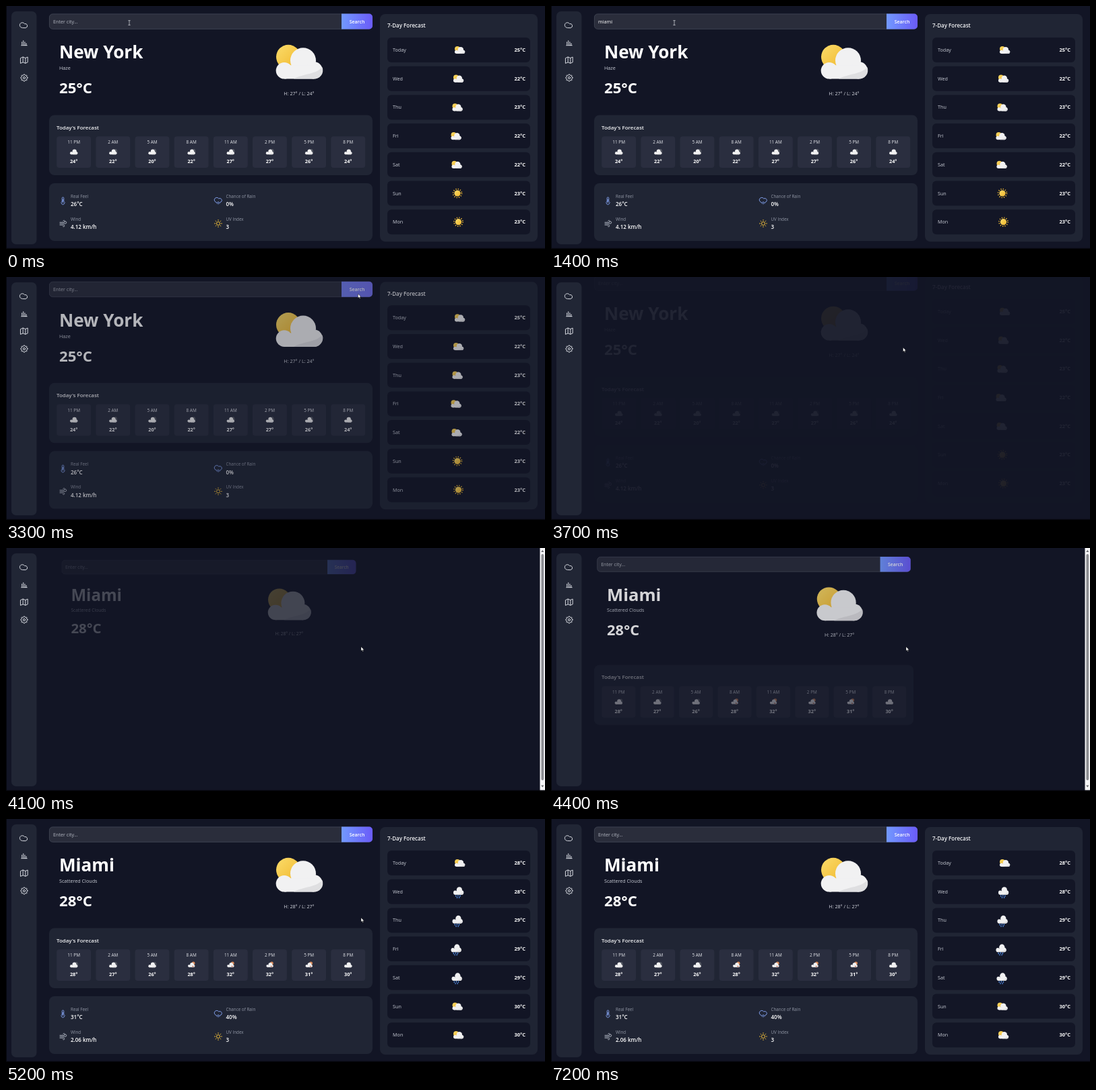
Animation, 800 px wide and 362 px high, one loop 7900 ms. Source, as an HTML page:

```html
<!DOCTYPE html>
<html lang="en">
<head>
<meta charset="utf-8">
<title>Weather dashboard</title>
<style>
html, body { margin: 0; width: 100%; height: 100%; overflow: hidden; background: #121525; }
svg { display: block; position: absolute; top: 0; left: 0; }
text { font-family: "Open Sans", "Noto Sans", sans-serif; white-space: pre; }
.line { fill: none; stroke-linecap: round; stroke-linejoin: round; }
</style>
</head>
<body>
<svg width="800" height="362" viewBox="0 0 800 362">
  <defs>
    <linearGradient id="btn"><stop stop-color="#7299ff"/><stop offset="1" stop-color="#6a5bf7"/></linearGradient>
    <linearGradient id="hover"><stop stop-color="#7280f0"/><stop offset="1" stop-color="#7271ee"/></linearGradient>
    <linearGradient id="gold" x2="1" y2="1"><stop stop-color="#fbdc6a"/><stop offset="1" stop-color="#f0b62c"/></linearGradient>
    <g id="cloud">
      <g fill="#f1f1f2">
        <circle cx="-22" cy="13" r="12.3"/><circle cx="6" cy="-2" r="19"/>
        <circle cx="22" cy="12.5" r="12.8"/><path d="M-22 5H22V25.3H-22Z"/>
      </g>
      <path d="M34.5 8C24 19 8 17 -8 25.3H22A12.8 12.8 0 0 0 34.5 8Z" fill="#dfdfe1"/>
    </g>
    <g id="part"><circle cx="-16" cy="-7.5" r="18" fill="url(#gold)"/><use href="#cloud"/></g>
    <g id="dark">
      <use href="#cloud"/>
      <path d="M14 -20C22 -30 38 -24 35 -10C42 -6 42 4 34 5C32 -2 26 -4 24 -4Q24 -14 14 -20Z" fill="#555963"/>
    </g>
    <g id="shower">
      <circle cx="18" cy="-12" r="15" fill="#d98a5a"/><use href="#cloud" transform="scale(.9)"/>
      <path d="M8 12L20 20" stroke="#b7614c" stroke-width="7"/>
    </g>
    <g id="rain">
      <use href="#cloud" transform="translate(0 -8) scale(1 1.15)"/>
      <path d="M-17 27v5M-3 25v5M11 27v5M-9 38v4M5 38v4" class="line" stroke="#4a7fd0" stroke-width="7"/>
    </g>
    <g id="sun">
      <circle r="21" fill="url(#gold)"/>
      <circle r="29" fill="none" stroke="#f3bd35" stroke-width="9" stroke-dasharray="5 10.18"/>
    </g>
  </defs>
  <path fill="#121525" d="M0 0H800V362H0Z"/>
  <g id="page"></g>
  <rect x="8" y="8" width="37.5" height="347" rx="7" fill="#212635"/>
  <g class="line" stroke="#d5d8df">
    <path d="M24 32.5A3.9 3.9 0 1 1 27.6 26.6A3 3 0 1 1 29.5 32.5Z"/>
    <path d="M23.6 59V53M25.7 59V51M27.9 59V53.500M30 59V55M22.500 58.700H31.500" stroke-width="1.300" stroke-dasharray="1.600 .4" stroke-linecap="butt"/>
    <path d="M21.800 77.500L25.200 76L28.800 77.500L32.200 76V83.800L28.800 85.300L25.200 83.800L21.800 85.300ZM25.200 76V83.800M28.800 77.500V85.300"/>
    <circle cx="27" cy="107" r="1.600"/>
    <path id="gear"/>
  </g>
  <path fill="#05060b" d="M0 0H1V362H0ZM0 360.700H800V362H0Z"/>
  <g id="top"></g>
</svg>
<script>
const LOOP = 7900, LEAVE = 3100, SWAP = 3800;
const $ = id => document.getElementById(id);
const clamp = v => Math.max(0, Math.min(1, v));
const ease = u => u * u * (3 - 2 * u);

const hours = ["11 PM", "2 AM", "5 AM", "8 AM", "11 AM", "2 PM", "5 PM", "8 PM"];
const days = ["Today", "Wed", "Thu", "Fri", "Sat", "Sun", "Mon"];
const iconX = [673.5, 671.5, 670, 668, 669, 670, 671.5];

const newYork = {
  city: "New York", sky: "Haze", temp: 25, range: "H: 27° / L: 24°",
  hourly: [24, 22, 20, 22, 27, 27, 26, 24], hourIcons: "cddddddc",
  week: [25, 22, 23, 22, 22, 23, 23], weekIcons: "pppppss",
  stats: ["26°C", "0%", "4.12 km/h", "3"]
};
const miami = {
  city: "Miami", sky: "Scattered Clouds", temp: 28, range: "H: 28° / L: 27°",
  hourly: [28, 27, 26, 28, 32, 32, 31, 30], hourIcons: "dddhhhhc",
  week: [28, 28, 29, 29, 29, 30, 30], weekIcons: "prrrrpp",
  stats: ["31°C", "40%", "2.06 km/h", "3"]
};
const icons = { c: "cloud", d: "dark", p: "part", h: "shower", r: "rain", s: "sun" };

// Pointer path: time, x, y
const path = [
  [1700, 400, 28], [1800, 497, 28], [2200, 497, 28], [2300, 520, 32], [2500, 597, 53],
  [2700, 594, 46], [2800, 575, 38], [3000, 523, 26], [3300, 522.5, 25], [3700, 522.5, 105],
  [4100, 527, 147], [6300, 527, 147], [6400, 515.5, 138.5], [6800, 515.5, 138.5], [7100, 424, 36]
];

const rect = (x, y, w, h, r, fill, more = "") =>
  `<rect x="${x}" y="${y}" width="${w}" height="${h}" rx="${r}" fill="${fill}" ${more}/>`;
const text = (x, y, size, str, fill = "#fff", weight = 400, anchor = "start") =>
  `<text x="${x}" y="${y}" font-size="${size}" fill="${fill}" font-weight="${weight}" text-anchor="${anchor}">${str}</text>`;
const icon = (key, x, y, s) =>
  `<use href="#${icons[key] || key}" transform="translate(${x} ${y}) scale(${s})"/>`;
const group = (body, opacity, transform = "") =>
  opacity > 0 ? `<g opacity="${opacity}" transform="${transform}">${body}</g>` : "";
const line = (d, color, width = 1) =>
  `<path class="line" d="${d}" stroke="${color}" stroke-width="${width}"/>`;

function spokes(cx, cy, n, r1, r2) {
  let d = "";
  for (let i = 0; i < n; i++) {
    const a = i * 2 * Math.PI / n, c = Math.cos(a), s = Math.sin(a);
    d += `M${cx + r1 * c} ${cy + r1 * s}L${cx + r2 * c} ${cy + r2 * s}`;
  }
  return d;
}

function gear(cx, cy) {
  const pts = [];
  for (let i = 0; i < 32; i++) {
    const a = (i - 0.5) * Math.PI / 16, r = i % 4 < 2 ? 5.2 : 4;
    pts.push(`${cx + r * Math.cos(a)} ${cy + r * Math.sin(a)}`);
  }
  return `M${pts.join("L")}Z`;
}

function search(right, typed, marked, hover) {
  const x = right - 46;
  let s = rect(64.4, 11.9, right - 64.8, 22.4, 5, "#2a2d3b", 'stroke="#454958" stroke-width=".8"');
  s += `<path d="M${x} 11.500H${right - 5}a5 5 0 0 1 5 5V29.500a5 5 0 0 1 -5 5H${x}Z" fill="url(#${hover ? "hover" : "btn"})"/>`;
  s += text(right - 23, 25.6, 7, "Search", "#fff", 600, "middle");
  s += typed ? text(70, 25.8, 7.2, typed) : text(70, 25.8, 7.2, "Enter city...", "#b4b8c2");
  if (marked) s += '<path d="M70 27.700H91" stroke="#c8703c" stroke-width=".8" stroke-dasharray="1 .6"/>';
  return s;
}

function current(data, right) {
  const x = 435 + (right - 544) * 0.75;
  return text(79, 78.4, 26.1, data.city, "#fff", 700) +
    text(79, 95.4, 7.2, data.sky, "#c9cdd6") +
    text(79, 130.3, 22.2, data.temp + "°C", "#fff", 700) +
    icon("p", x, 83.3, 1) +
    text(x, 133, 7.15, data.range, "#d3d6de", 400, "middle");
}

function today(data, right) {
  const w = (right - 64 - 22 - 51) / 8, step = w + 51 / 7;
  let s = rect(64, 162.5, right - 64, 89.5, 8, "#202534") +
    text(75, 183.6, 7.95, "Today's Forecast", "#f3f4f6", 600);
  hours.forEach((hour, i) => {
    const x = 75.2 + i * step, mid = x + w / 2;
    s += rect(x, 194.3, w, 46.8, 4, "#2a2e3f") +
      text(mid, 205.2, 6.4, hour, "#e3e5ea", 400, "middle") +
      icon(data.hourIcons[i], mid, 217, 0.165) +
      text(mid, 234.3, 7.3, data.hourly[i] + "°", "#fff", 700, "middle");
  });
  return s;
}

function details(data, right) {
  const col = 230.5 + (right - 544) / 2, blue = "#86a5f4";
  const labels = ["Real Feel", "Chance of Rain", "Wind", "UV Index"];
  let s = rect(64, 264, right - 64, 86, 8, "#202534");
  labels.forEach((label, i) => {
    const x = 96 + (i % 2) * col, y = i > 1 ? 34 : 0;
    s += text(x, 285.6 + y, 6.3, label, "#9298a6") + text(x, 298.2 + y, 8, data.stats[i], "#fff", 600);
  });
  s += line("M83.200 291V286.200a1.300 1.300 0 0 1 2.600 0V291a2.500 2.500 0 1 1 -2.600 0ZM84.500 288V293", blue, 0.9);
  s += line("M80 322.300H86a1.500 1.500 0 1 0 -1.400 -2.200M80 324.200H88a1.700 1.700 0 1 0 -1.500 -2.500M80 326.200H85.500a1.300 1.300 0 1 1 -1.200 1.900", "#b9bfca", 0.9);
  const mx = 84.5 + col;
  s += `<g transform="translate(${mx} 289.500)">` +
    line("M-3 3A3.600 3.600 0 1 1 .8 -2.500A3 3 0 1 1 3 3M-2 3V4.500M0 2V5.500M2 3V4.500", blue, 0.95) + "</g>";
  s += `<circle cx="${mx}" cy="324" r="2.500" fill="none" stroke="#efbd3a"/>` +
    line(spokes(mx, 324, 8, 4.3, 5.5), "#efbd3a", 0.95);
  return s;
}

function week(data, right) {
  let s = rect(555, 12, 234, 339, 8, "#202534") +
    text(566, 32.4, 8, "7-Day Forecast", "#f3f4f6", 600);
  days.forEach((day, i) => {
    const y = 47 + i * 42.7;
    s += rect(566, y, 212, 37, 6, "#131626") +
      text(574, y + 21, 7.2, day, "#c9cdd6") +
      icon(data.weekIcons[i], iconX[i], y + 18.5, 0.22) +
      text(771, y + 21, 7.5, data.week[i] + "°C", "#fff", 700, "end");
  });
  return `<g transform="translate(${right - 544} 0)">${s}</g>`;
}

function pointer(t) {
  if (t < path[0][0]) return [183, 25];
  let i = 0;
  while (i < path.length - 2 && t >= path[i + 1][0]) i++;
  const [a, b] = [path[i], path[i + 1]], u = clamp((t - a[0]) / (b[0] - a[0]));
  return [a[1] + (b[1] - a[1]) * u, a[2] + (b[2] - a[2]) * u];
}

function drawPointer(t, [x, y]) {
  if (t >= 7200) return "";
  const shape = t < 1800
    ? line("M-1.300 -3.300H1.300M0 -3.300V3.300M-1.300 3.300H1.300", "#d6d8de", 0.7)
    : '<path d="M0 0V6.300L1.500 5L2.500 7.300L3.500 6.900L2.500 4.700H4.500Z" fill="#fff" stroke="#000" stroke-width=".4"/>';
  return `<g transform="translate(${x} ${y})">${shape}</g>`;
}

const scrollbar = rect(792.5, 0, 7.5, 360.7, 0, "#f6f6f7") + rect(794.4, 9, 3.8, 337, 1.9, "#8b8c90") +
  '<path d="M794.200 6L796.300 3L798.400 6ZM794.200 353.500L796.300 356.500L798.400 353.500Z" fill="#6b6c70"/>';

function typedAt(t) {
  if (t < 500 || t >= LEAVE) return "";
  return "miami".slice(0, 1 + [900, 1000, 1200, 1400].filter(k => t >= k).length);
}

function render(t) {
  const pos = pointer(t), narrow = t >= SWAP && t < 4900, right = narrow ? 538 : 544;
  let page;
  if (t < SWAP) {
    const gone = clamp((t - LEAVE) / 640);
    const hover = t >= 1800 && pos[0] >= 498 && pos[0] <= 544 && pos[1] <= 34;
    page = group(search(right, typedAt(t), t >= 1700 && t < LEAVE, hover) + current(newYork, right) +
      today(newYork, right) + details(newYork, right) + week(newYork, right),
      1 - gone, `translate(0 ${-15 * gone})`);
  } else {
    const enter = start => ease(clamp((t - start) / 700));
    const [a, b, c, d] = [3890, 4090, 4400, 4520].map(enter);
    const cx = 32 + right / 2, k = 0.9 + 0.1 * a;
    page = group(search(right) + current(miami, right), a, `translate(${cx} 92) scale(${k}) translate(${-cx} -92)`) +
      group(today(miami, right), b, `translate(0 ${20 * (1 - b)})`) +
      group(details(miami, right), c, `translate(0 ${20 * (1 - c)})`) +
      group(week(miami, right), d, `translate(${20 * (1 - d)} 0)`);
  }
  $("page").innerHTML = page;
  $("top").innerHTML = (narrow ? scrollbar : "") + drawPointer(t, pos);
}

$("gear").setAttribute("d", gear(27, 107));
const begin = performance.now();
let shown = -1;
function tick() {
  const t = Math.floor(((performance.now() - begin) % LOOP) / 100) * 100;
  if (t !== shown) render(shown = t);
  requestAnimationFrame(tick);
}
tick();
</script>
</body>
</html>
```
